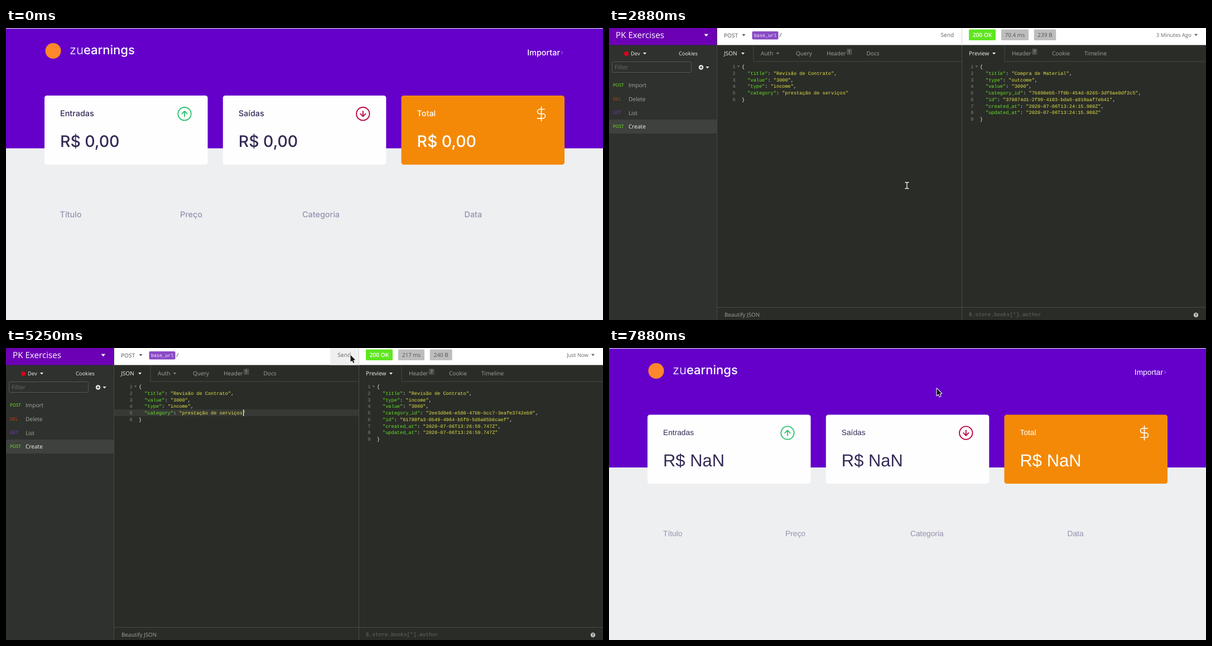
An HTML page with a canvas that plays this animation: 1070 px wide and 523 px high, repeating every 8 s.

```html
<!DOCTYPE html>
<html lang="pt">
<head>
<meta charset="utf-8">
<title>Finance dashboard demo</title>
<style>
  html, body { margin: 0; width: 100%; height: 100%; overflow: hidden; }
  canvas { display: block; }
</style>
</head>
<body>
<canvas id="stage" width="1070" height="523"></canvas>
<script>
const ctx = document.getElementById('stage').getContext('2d');
const LOOP = 8000, STEP = 125;
const GEO = 'Inter, sans-serif';
const ARIAL = '"Liberation Sans", Arial, sans-serif';
const UI = '"Open Sans", "Noto Sans", sans-serif';
const MONO = '"Liberation Mono", monospace';
const CHAR = 5.167, LINE = 11.75;

// Pointer path: [step, x, y]
const PATH = [
  [3, 626, 222], [4, 627, 227], [12, 627, 227], [13, 651, 190], [15, 540, 98],
  [17, 363, 150], [18, 440, 252], [19, 600, 287], [21, 534, 282],
  [25, 534, 282], [30, 617, 12], [46, 617, 12], [50, 587, 72]
];

function pointerAt(step) {
  const next = PATH.findIndex(p => p[0] > step);
  if (next === 0) return null;
  if (next < 0) return PATH[PATH.length - 1].slice(1);
  const [a, b] = [PATH[next - 1], PATH[next]];
  const k = (step - a[0]) / (b[0] - a[0]);
  return [a[1] + (b[1] - a[1]) * k, a[2] + (b[2] - a[2]) * k];
}

function rect(x, y, w, h, color, radius = 0) {
  ctx.fillStyle = color;
  ctx.beginPath();
  ctx.roundRect(x, y, w, h, radius);
  ctx.fill();
}

function disc(x, y, r, color) {
  ctx.fillStyle = color;
  ctx.beginPath();
  ctx.arc(x, y, r, 0, Math.PI * 2);
  ctx.fill();
}

function text(str, x, y, color, size, family, weight = 400, align = 'left') {
  ctx.font = `${weight} ${size}px ${family}`;
  ctx.textAlign = align;
  ctx.fillStyle = color;
  ctx.fillText(str, x, y);
}

const label = (str, x, y, color, size = 10.1, weight = 400, align) =>
  text(str, x, y, color, size, UI, weight, align);
const code = (str, x, y, color, size = 8.61, align) =>
  text(str, x, y, color, size, MONO, 400, align);

function polygon(points, x, y, color) {
  ctx.fillStyle = color;
  ctx.beginPath();
  points.forEach(([px, py]) => ctx.lineTo(x + px, y + py));
  ctx.closePath();
  ctx.fill();
}

const chevron = (x, y, color, w = 6) =>
  polygon([[0, 0], [w, 0], [w / 2, w * 0.6]], x, y - 1.5, color);

function icon(d, x, y, scale, color, width) {
  ctx.save();
  ctx.translate(x, y);
  ctx.scale(scale, scale);
  ctx.translate(-12, -12);
  ctx.strokeStyle = color;
  ctx.lineWidth = width;
  ctx.lineCap = ctx.lineJoin = 'round';
  ctx.stroke(new Path2D(d));
  ctx.restore();
}

function arrow(x, y) {
  ctx.strokeStyle = '#fff';
  ctx.lineWidth = 2;
  ctx.lineJoin = 'round';
  const shape = [[0.5, 0.5], [0.5, 13], [3.4, 10.4], [5.4, 15], [7.4, 14.1], [5.4, 9.7], [9.2, 9.4]];
  ctx.beginPath();
  shape.forEach(([px, py]) => ctx.lineTo(x + px, y + py));
  ctx.closePath();
  ctx.stroke();
  polygon(shape, x, y, '#161616');
}

function ibeam(x, y) {
  icon('M9 6.5H11L12 7.5L13 6.5H15M12 7.5V16.5M9 17.5H11L12 16.5L13 17.5H15', x, y, 1, '#f4f4f4', 1.3);
}

// Dashboard
const RING = 'M22 12A10 10 0 1 1 2 12A10 10 0 1 1 22 12';
const UP = RING + 'M12 16V8M8 12L12 8L16 12';
const DOWN = RING + 'M12 8V16M8 12L12 16L16 12';
const DOLLAR = 'M12 1V23M17 5H9.5a3.5 3.5 0 0 0 0 7h5a3.5 3.5 0 0 1 0 7H6';
const CARDS = [
  { x: 69, title: 'Entradas', icon: UP, tint: '#2dc26f' },
  { x: 388.8, title: 'Saídas', icon: DOWN, tint: '#b9003f' },
  { x: 708.5, title: 'Total', icon: DOLLAR, tint: '#fff', total: true }
];

function drawDashboard(fallback) {
  const dy = fallback ? -1.6 : 0;
  const family = fallback ? ARIAL : GEO;
  const weight = fallback ? 400 : 500;
  const small = fallback ? 13.75 : 14.4;
  const big = fallback ? 30.94 : 28.4;

  rect(0, 0, 1070, 523, '#eeeff1');
  rect(0, 1, 1070, 214.6 + dy, '#6400ca');

  disc(84.5, 41, 14, '#ff872c');
  text('zu', 114, 47, '#fff', 22, GEO, 300);
  const lead = ctx.measureText('zu').width;
  text('earnings', 114 + lead, 47, '#fff', 22, GEO, 500);
  text('Importar', 993, fallback ? 48 : 48.7, '#fff', small, family, weight, 'right');
  icon('M10.8 9.7L13.2 12L10.8 14.3', 996.7, 44 + dy / 3, 1, '#b98af0', 1);

  for (const card of CARDS) {
    const ink = card.total ? '#fff' : '#352a56';
    rect(card.x, 121 + dy, 292.5, 123.7, card.total ? '#f38906' : '#fffeff', 4.3);
    text(card.title, card.x + 28, 158 + dy, ink, small, family, weight);
    text(fallback ? 'R$ NaN' : 'R$ 0,00', card.x + 28, 213.3 + dy, ink, big, family, weight);
    icon(card.icon, card.x + 251, 153.7 + dy, 1.17, card.tint, card.total ? 1.4 : 1.6);
  }

  const columns = fallback ? [97, 316, 540, 821.5] : [96.5, 312, 531, 821.5];
  ['Título', 'Preço', 'Categoria', 'Data'].forEach((name, i) =>
    text(name, columns[i], 338.7 + dy, '#9590ad', small, family, weight));
}

// API client
const REQUEST = {
  title: 'Revisão de Contrato', value: '3000', type: 'income', category: 'prestação de serviços'
};
const response = (title, type, category_id, id, stamp) => ({
  title, type, value: '3000', category_id, id, created_at: stamp, updated_at: stamp
});
const BEFORE = {
  time: '70.4 ms', size: '239 B', age: '3 Minutes Ago', widths: [49, 39.5],
  body: response('Compra de Material', 'outcome', '7b898eb5-7f0b-454d-8265-3df6ae0df2c5',
    '370874d1-2f99-4103-bda6-a910aaf7eb41', '2020-07-06T13:24:15.980Z')
};
const AFTER = {
  time: '217 ms', size: '240 B', age: 'Just Now', widths: [47, 40],
  body: response('Revisão de Contrato', 'income', '2ee3d8e6-e580-47bb-bcc7-3eafe3742eb9',
    '61788fa3-0b49-4964-b5f0-5d6a05b6caef', '2020-07-06T13:26:59.747Z')
};

function drawJson(data, x) {
  const entries = Object.entries(data);
  const y = i => 72 + i * LINE;
  for (let i = 0; i < entries.length + 2; i++) code(i + 1, x - 11.4, y(i), '#878983', 8.61, 'right');
  chevron(x - 8.5, 69, '#6d6f69', 5);
  code('{', x, y(0), '#f2f2ee');
  entries.forEach(([key, value], i) => {
    const parts = [[`"${key}"`, '#67e629'], [': ', '#f2f2ee'], [`"${value}"`, '#e5e44a'],
      [i < entries.length - 1 ? ',' : '', '#f2f2ee']];
    let column = 2;
    for (const [part, color] of parts) {
      code(part, x + column * CHAR, y(i + 1), color);
      column += part.length;
    }
  });
  code('}', x, y(entries.length + 1), '#f2f2ee');
}

function drawTabs(left, right, split, tabs) {
  const border = '#474944';
  rect(split, 31, 1, 29, border);
  rect(split, 59.5, right - split, 1, border);
  rect(left, 500, right - left, 1, border);
  tabs.forEach(([name, x], i) => label(name, x, 49.3, i ? '#a2a3a0' : '#f1f1ef'));
}

function counter(n, x) {
  rect(x, 37, 9.5, 11, '#4b4d48', 1.5);
  label(n, x + 4.7, 45.2, '#c5c6c2', 7.5, 400, 'center');
}

function drawSidebar() {
  rect(0, 0, 193, 523, '#2e312d');
  rect(0, 0, 193, 30.5, '#6c00b5');
  label('PK Exercises', 12, 17.5, '#fff', 15.2);
  chevron(170.5, 12.3, '#fff', 7.5);
  disc(31, 46, 4.2, '#d6001c');
  label('Dev', 39, 48.8, '#f1f1ef', 9.4);
  chevron(61, 45.5, '#f1f1ef');
  label('Cookies', 125, 48.8, '#f1f1ef', 9.3);

  ctx.strokeStyle = '#555752';
  ctx.lineWidth = 1;
  ctx.beginPath();
  ctx.roundRect(5.5, 60.5, 142, 19, 2.5);
  ctx.stroke();
  label('Filter', 10, 74, '#696b66', 10.6);
  disc(165, 70.5, 4.2, '#f1f1ef');
  rect(162.5, 70, 5, 1.1, '#2e312d');
  rect(164.5, 68, 1.1, 5, '#2e312d');
  chevron(173.5, 70.5, '#f1f1ef');

  rect(0, 164, 193, 25, '#3e413d');
  [['POST', 'Import', '#75f02b'], ['DEL', 'Delete', '#d1480f'],
   ['GET', 'List', '#8439d6'], ['POST', 'Create', '#75f02b']].forEach(([verb, name, color], i) => {
    const y = 106 + i * 24.8;
    label(verb, 7, y - 1.2, color, 7.9);
    label(name, 35, y, i === 3 ? '#f4f4f2' : '#a5a6a3', 10.1);
  });
}

function drawClient(step, pointer) {
  const reply = step < 38 ? BEFORE : AFTER;
  const hover = pointer[0] > 581 && pointer[1] < 30;

  rect(0, 0, 1070, 523, '#2a2c27');
  drawSidebar();
  rect(193, 0, 1, 523, '#474944');
  rect(194, 0, 876, 30.5, '#fff');
  rect(632, 0, 1, 31, '#d5d5d5');
  rect(632, 31, 1, 492, '#4a4c47');

  label('POST', 206, 16.5, '#555');
  chevron(238.5, 12.5, '#555');
  rect(256.5, 6, 47, 14.5, '#8a4bc5', 2);
  code('base_url', 260, 16, '#f6efff', 8.4);
  code('/', 304.5, 16.2, '#333', 9.5);
  if (hover) rect(581, 0, 51, 30.5, '#f0f0f0');
  label('Send', 594.5, 16.3, '#606060');

  drawTabs(194, 632, 258.5, [['JSON', 206], ['Auth', 272], ['Query', 335], ['Header', 390], ['Docs', 461.5]]);
  chevron(237, 45.5, '#f1f1ef');
  chevron(299.5, 45.5, '#7d7f79');
  counter(1, 426);
  if (step >= 24) rect(194, 110, 438, 12, '#373935');
  drawJson(REQUEST, 238);
  const caret = (step >= 24 && step < 28) || (step >= 36 && step < 40) || step >= 42;
  if (caret) rect(425, 110, 1.2, 12, '#fff');
  label('Beautify JSON', 207, 517.3, '#a2a3a0', 9.8);

  rect(645, 2.5, 48, 19.5, '#5fe620', 1.5);
  label('200 OK', 669, 16, '#fff', 10.2, 600, 'center');
  const [timeWidth, sizeWidth] = reply.widths;
  const sizeX = 713 + timeWidth - 0.3;
  rect(703, 2.5, timeWidth, 19.5, '#bdbdbd', 1.5);
  label(reply.time, 703 + timeWidth / 2, 16, '#555', 9.8, 400, 'center');
  rect(sizeX, 2.5, sizeWidth, 19.5, '#bdbdbd', 1.5);
  label(reply.size, sizeX + sizeWidth / 2, 16, '#555', 10, 400, 'center');
  label(reply.age, 1044, 16, '#666', 9.5, 400, 'right');
  chevron(1049, 12.3, '#666');

  drawTabs(633, 1070, 708.5, [['Preview', 645], ['Header', 722], ['Cookie', 794], ['Timeline', 852]]);
  chevron(687, 45.5, '#f1f1ef');
  counter(7, 758);
  drawJson(reply.body, 664.7);
  code('$.store.books[*].author', 645, 516, '#666863', 9.42);
  disc(1052, 514, 4.2, '#c7c8c5');
  label('?', 1052, 517, '#2a2c27', 7.5, 700, 'center');

  const veil = { 36: 0.25, 37: 0.5, 38: 0.3, 39: 0.1 }[step];
  if (veil) rect(633, 0, 437, 523, `rgba(30, 32, 28, ${veil})`);
}

function draw(now) {
  const step = Math.floor((now % LOOP) / STEP);
  const pointer = pointerAt(step);
  const inClient = step >= 23 && step < 44;
  ctx.textRendering = 'geometricPrecision';
  if (inClient) drawClient(step, pointer);
  else drawDashboard(step >= 63);
  if (pointer) {
    if (inClient && pointer[1] > 60) ibeam(...pointer);
    else arrow(...pointer);
  }
}

const start = performance.now();
function tick() {
  draw(performance.now() - start);
  requestAnimationFrame(tick);
}
tick();
</script>
</body>
</html>
```
